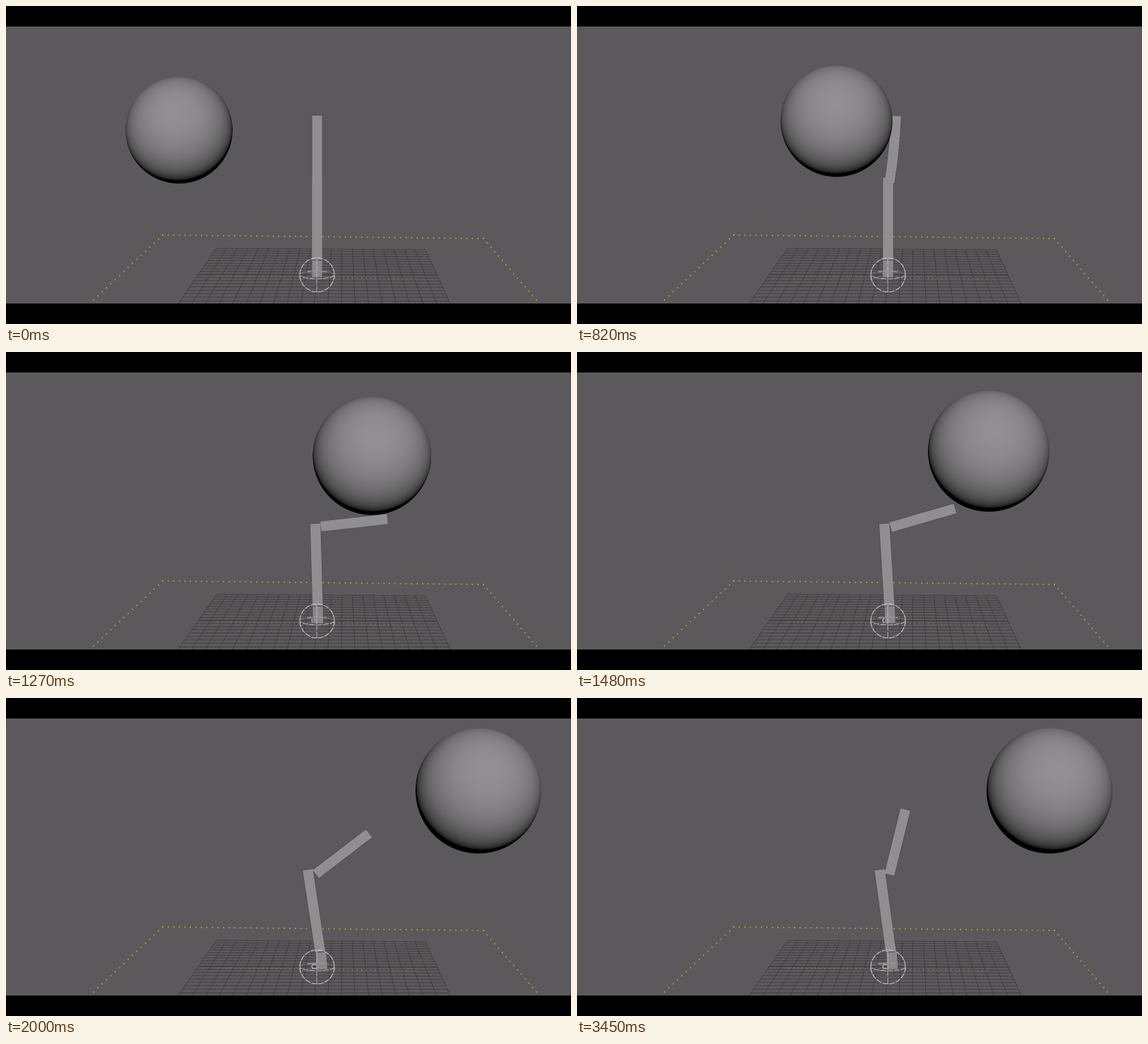
Recreate the animation shown at these times as an HTML page with a canvas. Size 800 px wide and 450 px high, loop 5.06 s.

```html
<!DOCTYPE html>
<html lang="en">
<head>
<meta charset="utf-8">
<title>Sphere and bar</title>
<style>
  html, body { margin: 0; width: 100%; height: 100%; overflow: hidden; background: #000; }
  canvas { display: block; }
</style>
</head>
<body>
<canvas id="stage" width="800" height="450"></canvas>
<script>
const LOOP = 5060, REST = 3450;
const TOP = 29, BOTTOM = 421;
const ctx = document.getElementById('stage').getContext('2d');

const lerp = (a, b, f) => a + (b - a) * f;
const clamp = (v, lo = 0, hi = 1) => Math.min(hi, Math.max(lo, v));
const smooth = f => f * f * (3 - 2 * f);
const ease = (t, start, duration) => smooth(clamp((t - start) / duration));

// The picture advances in 30 ms steps, with 10 ms extra now and then.
function snap(time) {
  const t = Math.min(time, REST);
  const shift = 10 * Math.floor((t + 650) / 1080);
  return Math.floor((t - shift) / 30) * 30 + shift;
}

function line(x1, y1, x2, y2, color, width = 1) {
  ctx.strokeStyle = color;
  ctx.lineWidth = width;
  ctx.beginPath();
  ctx.moveTo(x1, y1);
  ctx.lineTo(x2, y2);
  ctx.stroke();
}

function ring(x, y, rx, ry, color, from = 0, to = Math.PI * 2) {
  ctx.strokeStyle = color;
  ctx.lineWidth = 1.1;
  ctx.beginPath();
  ctx.ellipse(x, y, rx, ry, 0, from, to);
  ctx.stroke();
}

function dots(x1, y1, x2, y2, count, color, size) {
  ctx.fillStyle = color;
  for (let i = 0; i <= count; i++) {
    const f = i / count;
    ctx.fillRect(lerp(x1, x2, f) - size / 2, lerp(y1, y2, f) - size / 2, size, size);
  }
}

function drawFloor() {
  const color = 'rgba(48,47,48,.65)';
  for (let i = 0; i <= 20; i++) {
    const f = i / 20;
    line(lerp(298, 594, f), 343 + 2 * f, lerp(244, 629, f), BOTTOM, color, .9);
  }
  const near = 1 / 336, far = 1 / 296;
  for (let i = 0; i <= 20; i++) {
    const width = 1 / lerp(far, near, i / 10);
    const y = 343 + .92 * (width - 296);
    const f = (y - 343) / 77;
    line(lerp(298, 244, f), y, lerp(594, 629, f), y + 2 * (1 - f), color, i === 10 ? 1.5 : .9);
  }
  const yellow = '#a9a53b';
  dots(124, 416, 222, 324, 16, yellow, 1.8);
  dots(222, 324, 676, 329, 58, yellow, 1.8);
  dots(676, 329, 751, 416, 14, yellow, 1.8);
  dots(300, 382, 580, 386, 44, '#8b8647', 1.4);
}

function slab(a, b, width) {
  const dx = b[0] - a[0], dy = b[1] - a[1];
  const k = width / 2 / Math.hypot(dx, dy);
  const nx = -dy * k, ny = dx * k;
  return [[a[0] + nx, a[1] + ny], [b[0] + nx, b[1] + ny], [b[0] - nx, b[1] - ny], [a[0] - nx, a[1] - ny]];
}

// Outlines go first so that the fill hides inner seams.
function drawSlabs(slabs, fill) {
  const path = new Path2D();
  for (const [first, ...rest] of slabs) {
    path.moveTo(...first);
    rest.forEach(p => path.lineTo(...p));
    path.closePath();
  }
  ctx.strokeStyle = '#454346';
  ctx.lineWidth = 1.1;
  ctx.stroke(path);
  ctx.fillStyle = fill;
  ctx.fill(path);
}

// The upper bar is pushed over by the sphere, sagging, then swings back.
function upperBar(t, headX) {
  const push = clamp((t - 790) / 450);
  const degrees = Math.min(85 * push, 4.3 + 7.15e-6 * (4600 - t) ** 2);
  const angle = degrees * Math.PI / 180;
  const sin = Math.sin(angle), cos = Math.cos(angle);
  const pivotX = headX + lerp(-7, 7, Math.min(1, 2 * push));
  const pivotY = 250 - .12 * degrees;
  const length = 95, sag = 14 * Math.sin(Math.PI * push);
  const point = f => {
    const along = length * f, across = 7 + sag * 2 * f * (1 - f);
    return [pivotX + along * sin + across * cos, pivotY - along * cos + across * sin];
  };
  return Array.from({ length: 6 }, (_, i) => slab(point(i / 6), point((i + 1) / 6), 14.2));
}

function drawBars(t) {
  const lean = 16 * ease(t, 900, 1500) - 4.8 * ease(t, 2400, 1400);
  const head = 440.5 - lean, foot = 440.5 + .33 * lean, base = 440.5 + .55 * lean;
  drawSlabs([slab([base, 384], [lerp(foot, base, .4), 360], 14.5)], '#89878a');
  drawSlabs([slab([foot, 359], [head, 243], 14.5), ...upperBar(t, head)], '#908e91');
}

function drawPivot() {
  line(427, 376, 454, 376, '#a888ac', 1.5);
  ring(437, 380, 4, 3, '#d0d0d0');
}

function drawManipulator() {
  const x = 440.5, y = 380.5;
  ctx.setLineDash([8, 1.5]);
  ring(x, y, 24.5, 24, '#c8cbc8');
  ring(x, y, 24.5, 5.5, '#b4b8b4', 0, Math.PI);
  ring(x, y, 24.5, 5.5, 'rgba(185,189,185,.4)', Math.PI);
  line(x - .5, 358, x - .5, 404, '#b4b6b4', 1.1);
  ctx.setLineDash([]);
}

const ballSize = 200;
const ball = document.createElement('canvas');
ball.width = ball.height = ballSize;
const ballCtx = ball.getContext('2d');

// Shades the sphere per pixel with a diffuse light that shifts as it travels.
function drawSphere(t) {
  const p = ease(t, 160, 1858);
  const cx = lerp(245, 669, p), cy = lerp(175.5, 131, p);
  const r = 1 / lerp(1 / 75.7, 1 / 89, p);
  const left = Math.floor(cx - ballSize / 2), top = Math.floor(cy - ballSize / 2);
  const lx = lerp(-.08, .15, p), ly = -.34, lz = Math.sqrt(1 - lx * lx - ly * ly);
  const image = ballCtx.createImageData(ballSize, ballSize);
  for (let j = 0, k = 0; j < ballSize; j++) {
    for (let i = 0; i < ballSize; i++, k += 4) {
      const dx = left + i + .5 - cx, dy = top + j + .5 - cy;
      const d = Math.hypot(dx, dy);
      if (d > r + .5) continue;
      const nx = dx / r, ny = dy / r, nz = Math.sqrt(Math.max(0, 1 - nx * nx - ny * ny));
      const shade = 146 * Math.sqrt(Math.max(0, nx * lx + ny * ly + nz * lz));
      image.data[k] = image.data[k + 2] = shade;
      image.data[k + 1] = shade * .985;
      image.data[k + 3] = 255 * clamp(r - d + .5);
    }
  }
  ballCtx.putImageData(image, 0, 0);
  ctx.drawImage(ball, left, top);
}

function draw(t) {
  ctx.fillStyle = '#000';
  ctx.fillRect(0, 0, 800, 450);
  ctx.save();
  ctx.beginPath();
  ctx.rect(0, TOP, 800, BOTTOM - TOP);
  ctx.clip();
  ctx.fillStyle = '#5b595b';
  ctx.fillRect(0, TOP, 800, BOTTOM - TOP);
  drawFloor();
  drawPivot();
  drawBars(t);
  drawSphere(t);
  drawManipulator();
  ctx.restore();
}

const start = performance.now();
let shown = -1;
function tick() {
  const t = snap((performance.now() - start) % LOOP);
  if (t !== shown) draw(shown = t);
  requestAnimationFrame(tick);
}
tick();
</script>
</body>
</html>
```
